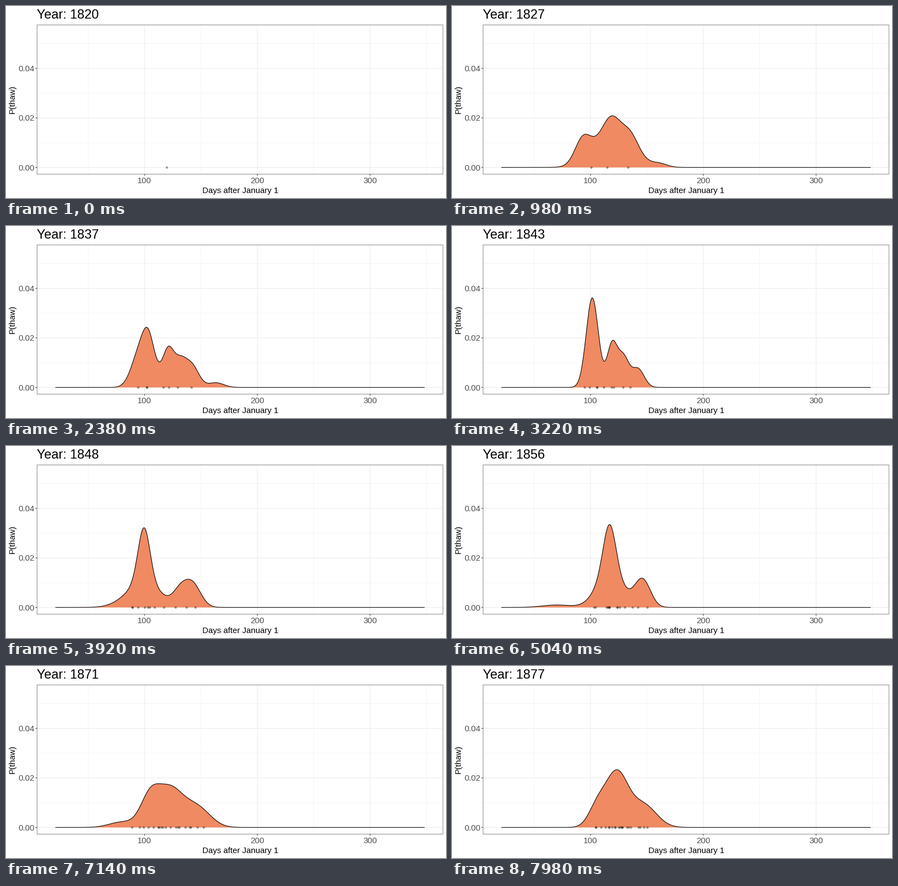
Animation of 800 by 350 pixels, one loop 8 s. Source, as a matplotlib script:

```python
import matplotlib.pyplot as plt
import numpy as np
from matplotlib.animation import FuncAnimation

W, H, DPI = 800, 350, 100
LOOP, TICK, YEAR_MS = 8000, 20, 140
PT = 72 / DPI  # points per pixel
FIRST_YEAR, FIRST_CURVE = 1820, 4
LEFT, RIGHT, TOP, BOTTOM = 56.5, 794.5, 34.5, 306.5

plt.rcParams["font.family"] = "Liberation Sans"

# Years after the start -> bumps (day, spread, height in 1e-4)
CURVES = {
    4: [(120, 16, 245)],
    12: [(93, 7, 246), (118, 7, 143), (136, 7, 133), (161, 7, 35)],
    23: [(101.5, 5.4, 362), (119, 4.5, 170), (129, 5, 120), (142, 5.5, 75)],
    28: [(99, 15, 100), (99.5, 5.3, 222), (131, 6, 50), (142, 7.5, 98)],
    36: [(70, 13, 10), (116.8, 5.5, 190), (117, 11.5, 145), (146, 7, 112)],
    44: [(80.5, 11, 46), (107, 9.5, 196), (133.5, 10.5, 86), (151, 11, 58)],
    57: [(105.5, 7.5, 75), (123, 10, 218), (147, 11.5, 90)],
}

DAYS = np.linspace(20.85, 348.4, 656)


def px(day):
    return 47 + 2.05 * np.asarray(day)


def py(p):
    return 294.3 - 4515 * np.asarray(p)


def mixture(bumps, shift=0):
    return sum(h * 1e-4 * np.exp(-0.5 * ((DAYS - d - shift) / s) ** 2)
               for d, s, h in bumps)


def density(step):
    """Blend the neighbouring curves, swaying a little from year to year."""
    step = max(step, FIRST_CURVE)
    a = max(k for k in CURVES if k <= step)
    b = min((k for k in CURVES if k > step), default=a)
    u = (step - a) / max(b - a, 1)
    shift = np.random.default_rng(step).normal(0, 2) * np.sin(np.pi * u)
    return ((1 - u) * mixture(CURVES[a], shift)
            + u * mixture(CURVES[b], shift))


def observations(step):
    """Thaw days spread along the year's distribution; more lakes each year."""
    n = 1 + round(0.35 * step)
    cdf = np.cumsum(density(step))
    q = 0.06 + 0.88 * (np.arange(n) + 0.5) / n
    noise = np.random.default_rng(100 + step).normal(0, 2.5, n)
    return np.interp(q, cdf / cdf[-1], DAYS) + noise * (1 - 1 / n)


fig = plt.figure(figsize=(W / DPI, H / DPI), dpi=DPI, facecolor="white")
ax = fig.add_axes([0, 0, 1, 1])
ax.set(xlim=(0, W), ylim=(H, 0))
ax.axis("off")


def stroke(xs, ys, color, width, z):
    return ax.plot(xs, ys, color=color, lw=width * PT, zorder=z, snap=False,
                   solid_capstyle="butt", solid_joinstyle="round")[0]


def label(x, y, text, size=15, color="black", **kw):
    return ax.text(x, y, text, fontsize=size * PT, color=color,
                   va="baseline", **kw)


def grid(days, probs, width):
    for d in days:
        stroke([px(d)] * 2, [TOP, BOTTOM], "#ebebeb", width, 1)
    for p in probs:
        stroke([LEFT, RIGHT], [py(p)] * 2, "#ebebeb", width, 1)


grid((50, 150, 250, 350), (0.01, 0.03, 0.05), 0.55)
grid((100, 200, 300), (0, 0.02, 0.04), 1.07)

for d in (100, 200, 300):
    stroke([px(d)] * 2, [BOTTOM, BOTTOM + 2.8], "#333333", 1.07, 6)
    label(px(d), 323, str(d), color="#4d4d4d", ha="center")
for p in (0, 0.02, 0.04):
    stroke([LEFT - 2.8, LEFT], [py(p)] * 2, "#333333", 1.07, 6)
    label(51.6, py(p) + 5.4, f"{p:.2f}", color="#4d4d4d", ha="right")

stroke([LEFT, RIGHT, RIGHT, LEFT, LEFT], [TOP, TOP, BOTTOM, BOTTOM, TOP],
       "#333333", 0.57, 6)
label(425.8, 341, "Days after January 1", ha="center")
label(16, 170, "P(thaw)", ha="center", rotation=90, rotation_mode="anchor")
title = label(56.3, 23, "", size=23.5, ha="left")

area = ax.fill([0, 1, 1], [0, 0, 1], color="#ef8a62", lw=0, zorder=3)[0]
curve = stroke([], [], "black", 1.07, 4)
dots = ax.plot([], [], "o", ms=3.2 * PT, mfc=(0, 0, 0, 0.25),
               mec=(0, 0, 0, 0.42), mew=0.9 * PT, zorder=5, snap=False)[0]


def update(i):
    step = i * TICK // YEAR_MS
    title.set_text(f"Year: {FIRST_YEAR + step}")
    days = observations(step)
    dots.set_data(px(days), np.full(len(days), py(0)))

    x, y = px(DAYS), py(density(step))
    base = [(x[-1], py(0)), (x[0], py(0))]
    curve.set_data(x, y)
    area.set_xy(np.vstack([np.column_stack([x, y]), base]))
    for part in (area, curve):
        part.set_visible(step >= FIRST_CURVE)
    return title, area, curve, dots


anim = FuncAnimation(fig, update, frames=LOOP // TICK, interval=TICK,
                     repeat=True, repeat_delay=0, blit=False)
plt.show()
```
